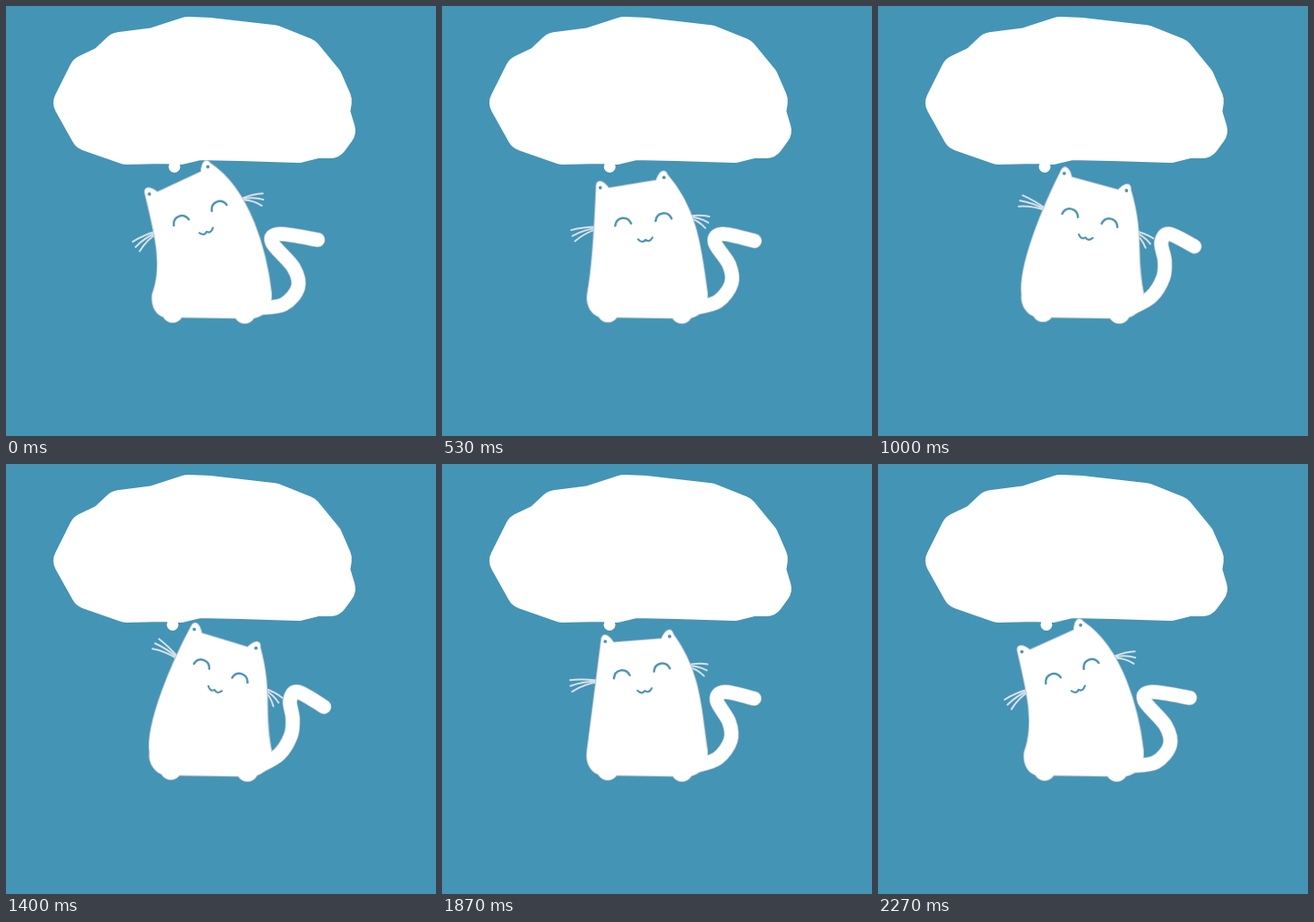
These frames come from a looping animation (480 px wide and 480 px high, 2.34 s). An HTML page with a canvas:

```html
<!DOCTYPE html>
<html lang="en">
<head>
<meta charset="utf-8">
<title>Swaying cat</title>
<style>
  html, body { margin: 0; width: 100%; height: 100%; overflow: hidden; background: #4494b6; }
  canvas { display: block; width: 480px; height: 480px; }
</style>
</head>
<body>
<canvas id="stage" width="480" height="480"></canvas>
<script>
const ctx = document.getElementById('stage').getContext('2d');
const LOOP = 2340, FPS = 15;
const BLUE = '#4494b6', EDGE = '#bccad3', WHITE = '#fff', INK = '#5096b1';

const rad = degrees => degrees * Math.PI / 180;
const ease = u => (1 - Math.cos(Math.PI * Math.max(0, Math.min(1, u)))) / 2;

// Goes from 0 to 1 between a and b, and back between c and d.
const sway = (t, a, b, c, d) => ease((t - a) / (b - a)) - ease((t - c) / (d - c));

// Places local points in a frame with the given origin and tilt.
function frame(x, y, degrees) {
  const cos = Math.cos(rad(degrees)), sin = Math.sin(rad(degrees));
  return (px, py) => [x + px * cos - py * sin, y + px * sin + py * cos];
}

function stroke(path, color, width) {
  ctx.strokeStyle = color;
  ctx.lineWidth = width;
  ctx.stroke(path);
}

function fill(path, color) {
  ctx.fillStyle = color;
  ctx.fill(path);
}

function disc(x, y, r) {
  const path = new Path2D();
  path.arc(x, y, r, 0, 2 * Math.PI);
  return path;
}

function smooth(points) {
  const at = i => points[Math.max(0, Math.min(points.length - 1, i))];
  const path = new Path2D();
  path.moveTo(...points[0]);
  for (let i = 0; i < points.length - 1; i++) {
    const [p, q, r, s] = [at(i - 1), at(i), at(i + 1), at(i + 2)];
    path.bezierCurveTo(q[0] + (r[0] - p[0]) / 6, q[1] + (r[1] - p[1]) / 6,
      r[0] - (s[0] - q[0]) / 6, r[1] - (s[1] - q[1]) / 6, ...r);
  }
  return path;
}

// A polygon whose wide round outline gives the soft lobes.
const bubble = new Path2D(`M73 108 L90 74 111 64 127 49 166 44 203 32 228 33 298 41 333 55
  356 83 366 106 364 119 370 139 362 150 346 150 326 155 262 153 215 152 194 157
  174 156 135 157 92 142Z`);

function drawBubble(lean) {
  fill(bubble, WHITE);
  stroke(bubble, WHITE, 40);
  fill(disc(188 - 2 * lean, 179.5, 6.5), WHITE);
}

// The base stays put while both flanks stretch up to the tilted head.
function bodyPath(head, lean) {
  const base = 163.5 - 3 * lean;
  const path = new Path2D();
  path.moveTo(base, 322);
  path.bezierCurveTo(176 - 20 * lean, 290, ...head(-49, 48), ...head(-40, 4));
  path.bezierCurveTo(...head(-39, -2.5), ...head(-33, -3), ...head(-27, 8.3));
  path.lineTo(...head(27, 8.3));
  path.bezierCurveTo(...head(33, -3), ...head(39, -2.5), ...head(40, 4));
  path.bezierCurveTo(...head(68, 49), 291 - 4 * lean, 275, 296, 320);
  path.bezierCurveTo(297, 335, 290, 346, 275, 348.5);
  path.lineTo(178, 347);
  path.bezierCurveTo(168, 346, base - 1.5, 335, base, 322);
  return path;
}

// Each joint drifts along its own line as the cat leans; the tip droops late.
function tailPath(lean, droop) {
  return smooth([
    [283, 337],
    [310 - 5 * lean, 333 - 9 * lean],
    [326 - 8 * lean, 314 - 11 * lean],
    [321 - lean, 292 - 8 * lean],
    [297 + 20 * lean, 264],
    [306 + 20 * lean, 254.5],
    [348 + 7 * droop, 261 + 10 * droop]
  ]);
}

function drawWhiskers(face, tilt, flick) {
  const fan = (dir, length, droop, spread) => {
    for (const k of [-1, 0, 1]) {
      const a = rad(droop + k * spread);
      const whisker = frame(...face(dir * 54, 4), tilt);
      const dx = dir * Math.cos(a) * length, dy = Math.sin(a) * length;
      const path = new Path2D();
      path.moveTo(...whisker(-dir * 3, k));
      path.quadraticCurveTo(...whisker(dx / 2, dy / 2 - 2.5), ...whisker(dx, dy));
      stroke(path, '#d6e1e8', 2);
    }
  };
  fan(-1, 27, 15 - 29 * flick, 14);
  fan(1, 20, 26, 20);
}

function drawCat(head, lean, droop) {
  const tail = tailPath(lean, droop);
  const solids = [
    bodyPath(head, lean),
    disc(186 - 2 * lean, 341.5 - lean, 11.5),
    disc(266.5 + 3 * lean, 342.5, 11.5)
  ];
  solids.forEach(path => stroke(path, EDGE, 2));
  stroke(tail, EDGE, 16.6);
  solids.forEach(path => fill(path, WHITE));
  stroke(tail, WHITE, 15);
  for (const side of [-36, 36]) fill(disc(...head(side, 6.3), 1.9), INK);
}

function drawFace(face) {
  for (const eye of [-22.7, 22.7]) {
    const arc = new Path2D();
    arc.moveTo(...face(eye - 9, 4));
    arc.bezierCurveTo(...face(eye - 6.5, -6), ...face(eye + 6, -6), ...face(eye + 9, 3.5));
    stroke(arc, INK, 2.5);
  }
  const mouth = new Path2D();
  mouth.moveTo(...face(-8, 22));
  mouth.quadraticCurveTo(...face(-4, 27.5), ...face(0, 23.5));
  mouth.quadraticCurveTo(...face(4, 27.5), ...face(8, 22));
  stroke(mouth, INK, 2.2);
}

function draw(now) {
  const step = Math.floor((now % LOOP + 4) * FPS / 1000);
  const t = Math.min(step, 34) * 1000 / FPS;

  const lean = sway(t, 100, 1130, 1380, LOOP);
  const turn = sway(t, 0, 1330, 1380, 2130);
  const flick = sway(t, 300, 1400, 1400, LOOP);
  const dip = Math.max(0, Math.sin(Math.PI * t / 1330));   // only on the way right

  const tilt = 41 * turn - 21;
  const head = frame(190 + 56.5 * lean, 189 + 2 * dip, 42 * lean - 25);
  const face = frame(215.5 + 25.5 * turn, 230 + 8 * dip, tilt);

  ctx.fillStyle = BLUE;
  ctx.fillRect(0, 0, 480, 480);
  drawBubble(lean);
  drawWhiskers(face, tilt, flick);
  drawCat(head, lean, turn * turn);
  drawFace(face);
}

ctx.lineCap = ctx.lineJoin = 'round';
const start = performance.now();
function tick() {
  draw(performance.now() - start);
  requestAnimationFrame(tick);
}
tick();
</script>
</body>
</html>
```
